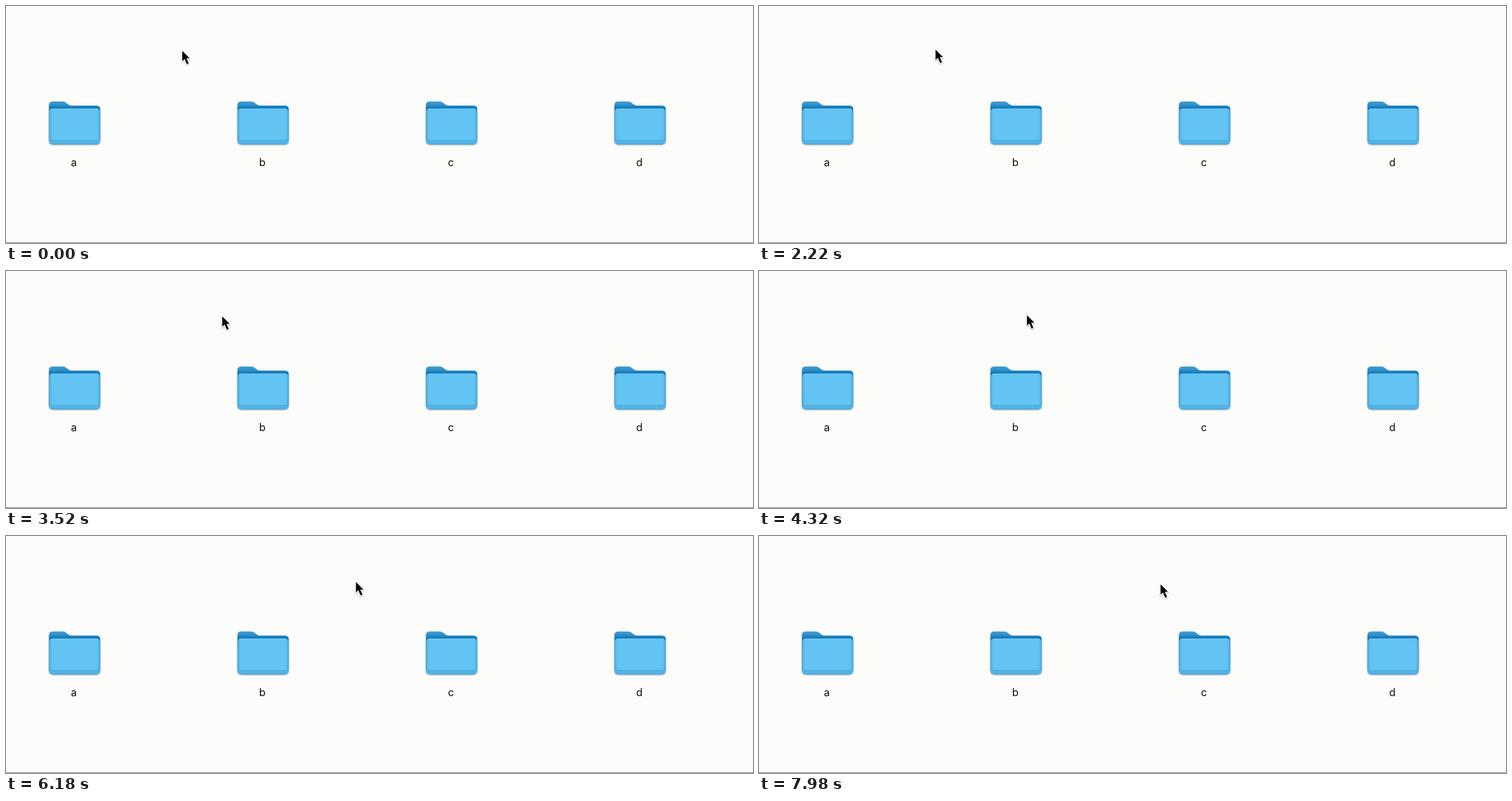
Animation of 1280x407 px, one loop 8000 ms. Source, as an HTML page:

```html
<!DOCTYPE html>
<html lang="en">
<head>
<meta charset="utf-8">
<title>Folders</title>
<style>
  html, body { margin: 0; width: 100%; height: 100%; overflow: hidden; background: #fcfcfb; }
  svg { display: block; }
  text { font: 18px Inter, Roboto, sans-serif; text-anchor: middle; fill: #0c0c0c; }
</style>
</head>
<body>
<svg width="1280" height="407" viewBox="0 0 1280 407">
  <defs>
    <linearGradient id="back" x2="0" y2="1">
      <stop offset="0" stop-color="#469fd3"/>
      <stop offset=".09" stop-color="#2b8dc8"/>
      <stop offset=".17" stop-color="#0873b5"/>
    </linearGradient>
    <linearGradient id="edge">
      <stop offset="0" stop-color="#48a8da"/>
      <stop offset=".06" stop-color="#64c4f3"/>
      <stop offset=".94" stop-color="#64c4f3"/>
      <stop offset="1" stop-color="#48a8da"/>
    </linearGradient>
    <filter id="soft" x="-20%" y="-20%" width="140%" height="150%">
      <feDropShadow dx="0" dy="1" stdDeviation="1" flood-opacity=".4"/>
    </filter>
    <g id="folder">
      <g filter="url(#soft)">
        <path fill="url(#back)" d="M73.7 170q0-6 6-6H97c7 0 8 7 16 7h42q6.3 0 6.3 6v53q0 7.5-7 7.5H80.5q-6.8 0-6.8-7.5z"/>
        <rect x="73.7" y="176" width="87.6" height="61.5" rx="6" fill="url(#edge)"/>
      </g>
      <path fill="#52b3e6" d="M74 231h87q0 6.5-6.5 6.5h-74q-6.5 0-6.5-6.5z"/>
      <path fill="none" stroke="#7ccbf2" d="M76 178.5q1-2 4-2h75q3 0 4 2"/>
      <path stroke="#4aa9dd" d="M75 230.5h85M79 237h77"/>
    </g>
  </defs>
  <g id="folders"></g>
  <path stroke="#777774" d="M0 406.5h1280"/>
  <path id="cursor" filter="url(#soft)" stroke="#fff" stroke-width="2.4" stroke-linejoin="round" paint-order="stroke"
    d="M0 0v17.8l4-3.8 3.9 9 3.2-1.4-3.8-8.8h5.4z"/>
</svg>
<script>
const LOOP = 8000;
// Pointer tip: time, x, y
const path = [
  [0, 302, 77], [450, 301, 75], [900, 301, 78], [1500, 301, 77], [2220, 302.5, 75], [2700, 304, 75.5],
  [3520, 370.5, 78], [4320, 459, 76], [4600, 492, 75], [5440, 565, 78],
  [6100, 598, 79], [7120, 613, 80], [7980, 688, 83], [LOOP, 690, 83]
];
const cursor = document.getElementById('cursor');

document.getElementById('folders').innerHTML = [...'abcd'].map((name, i) =>
  `<g transform="translate(${i * 323})"><use href="#folder"/><text x="116.3" y="275">${name}</text></g>`
).join('');

const slope = (i, k) => (path[i + 1][k] - path[i][k]) / (path[i + 1][0] - path[i][0]);

// Tangent that never overshoots the points
function tangent(i, k) {
  if (i === 0 || i === path.length - 1) return 0;
  const a = slope(i - 1, k), b = slope(i, k);
  return a * b > 0 ? 2 * a * b / (a + b) : 0;
}

function valueAt(t, k) {
  const i = path.findIndex((p, n) => n < path.length - 1 && t < path[n + 1][0]);
  const [p, q] = [path[i], path[i + 1]];
  const d = q[0] - p[0], u = (t - p[0]) / d, v = 1 - u;
  return v * v * ((1 + 2 * u) * p[k] + u * d * tangent(i, k))
    + u * u * ((3 - 2 * u) * q[k] - v * d * tangent(i + 1, k));
}

const start = performance.now();
function draw() {
  const t = (performance.now() - start) % LOOP;
  cursor.setAttribute('transform', `translate(${valueAt(t, 1)} ${valueAt(t, 2)})`);
  requestAnimationFrame(draw);
}
draw();
</script>
</body>
</html>
```
